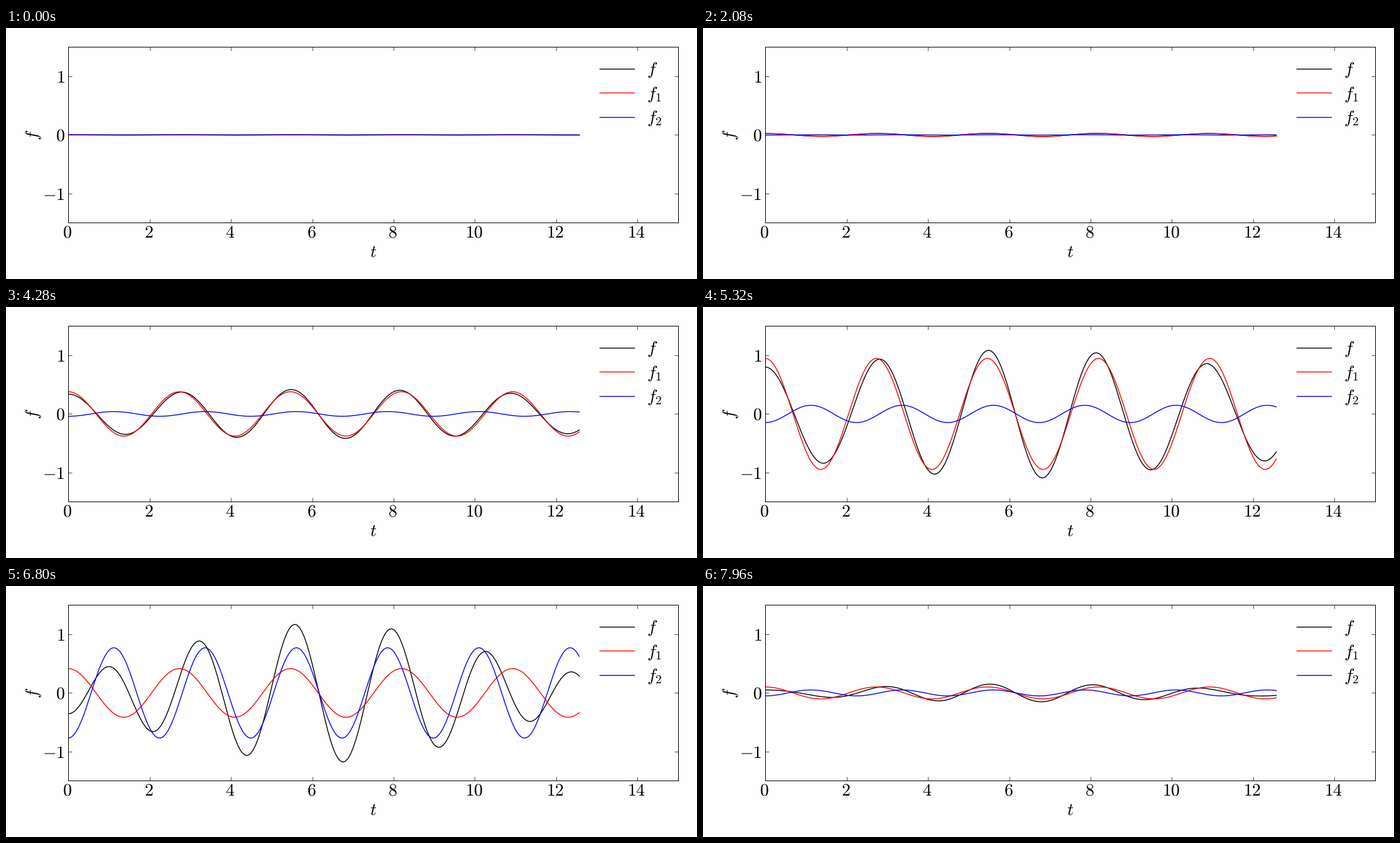
Animation, 1100 px wide and 400 px high, one loop 8 s. Source, as a matplotlib script:

```python
import numpy as np
import matplotlib.pyplot as plt
from matplotlib.animation import FuncAnimation
from matplotlib.lines import Line2D

W, H, DPI = 1100, 400, 100
LEFT, RIGHT, TOP, BOTTOM = 99.12, 1070.12, 30.4, 310.4
FRAMES, STEP = 200, 40
W1, W2 = 2.3, 2.8          # angular frequencies of the two modes
RATE = 1.25                # growth and decay rate per second
PEAK1, PEAK2 = 5.58, 7.40  # seconds at which each mode is strongest
CRASH, CRASH_RATE = 7.72, 11.2
PAPER = "#fefefe"
COLORS = ("black", "red", "blue")

plt.rcParams.update({"mathtext.fontset": "cm", "text.hinting": "none"})


def pulse(s, peak):
    return 1 / np.cosh(RATE * (s - peak))


def crash(s):
    """Sudden loss of the second mode."""
    return 1 / (1 + np.exp(CRASH_RATE * (s - CRASH)))


fig = plt.figure(figsize=(W / DPI, H / DPI), dpi=DPI, facecolor=PAPER)
ax = fig.add_axes([LEFT / W, 1 - BOTTOM / H,
                   (RIGHT - LEFT) / W, (BOTTOM - TOP) / H], facecolor=PAPER)
ax.set(xlim=(0, 15), ylim=(-1.5, 1.5),
       xticks=range(0, 15, 2), yticks=(-1, 0, 1))
ax.tick_params(direction="in", length=4, width=.5, top=True, right=True,
               labelbottom=False, labelleft=False)
for spine in ax.spines.values():
    spine.set_linewidth(.72)


def label(x, y, s, **kw):
    """Place math text with its baseline at pixel (x, y) from the top left."""
    opts = dict(fontsize=20, ha="center", va="baseline", color="black")
    fig.text(x / W, 1 - y / H, f"${s}$", **{**opts, **kw})


for n in range(0, 15, 2):
    label(LEFT + n * (RIGHT - LEFT) / 15 - 1.4, 334.5, n)
for n in (-1, 0, 1):
    label(93.3, 180.6 - n * (BOTTOM - TOP) / 3, n, ha="right")
label(585, 365, "t")
label(51.5, 170, "f", rotation=90, rotation_mode="anchor")

for i, (color, name) in enumerate(zip(COLORS, ("f", "f_1", "f_2"))):
    y = 65 + 38.4 * i
    fig.add_artist(Line2D([944.7 / W, 1000.3 / W], [1 - y / H] * 2, color=color,
                          lw=1, solid_capstyle="projecting"))
    label(1020.5, y + 9.5, name, ha="left")

t = np.linspace(0, 4 * np.pi, 200)
lines = [ax.plot([], [], color=c, lw=1)[0] for c in COLORS]


def draw(k):
    s = k * STEP / 1000
    f1 = pulse(s, PEAK1) * np.cos(W1 * t)
    f2 = -pulse(s, PEAK2) * crash(s) * np.cos(W2 * t)
    for line, y in zip(lines, (f1 + f2, f1, f2)):
        line.set_data(t, y)
    return lines


anim = FuncAnimation(fig, draw, frames=FRAMES, interval=STEP,
                     repeat=True, repeat_delay=0, blit=False)
plt.show()
```
